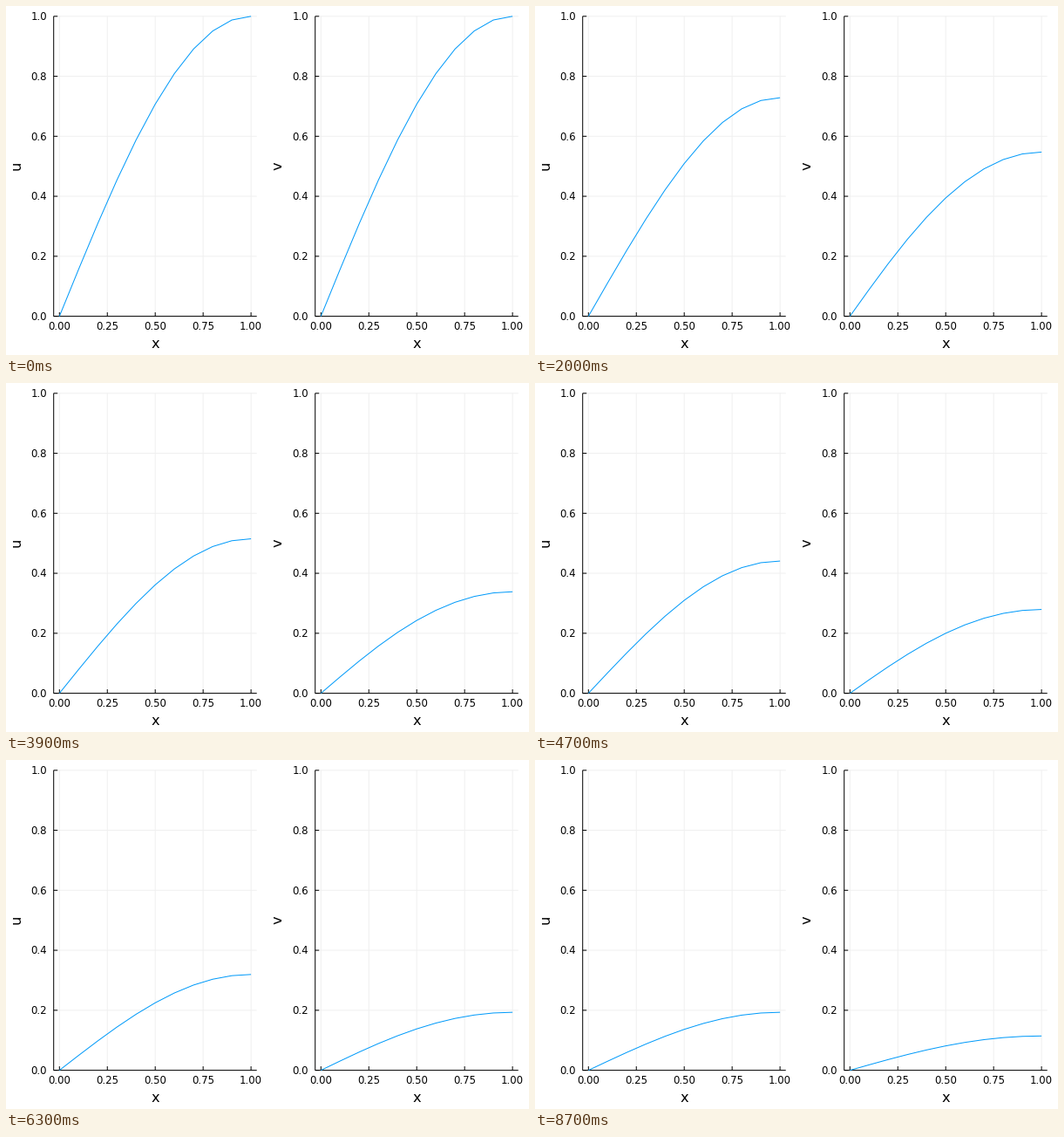
These frames come from a looping animation (600 px wide and 400 px high, 8800 ms). A matplotlib script:

```python
import numpy as np
import matplotlib.pyplot as plt
from matplotlib.animation import FuncAnimation

W, H, DPI = 600, 400, 100
PX = 72 / DPI
FRAMES, INTERVAL = 88, 100
PANEL_W, X0, X_SPAN = 300, 61.3, 219.8
Y0, Y_SPAN = 355.6, 343.8
LEFT, RIGHT = 54.7, 287.7
DU, DV = 0.8, 0.7

plt.rcParams["font.family"] = "DejaVu Sans"

x = np.linspace(0, 1, 11)
diffusion = np.array([[DU], [DV]])


def close_ends(w):
    """Zero value on the left, zero slope on the right."""
    w[..., 0] = 0
    w[..., -1] = (4 * w[..., -2] - w[..., -3]) / 3
    return w


def rate(w):
    d = np.zeros_like(w)
    d[:, 1:-1] = diffusion * (w[:, 2:] - 2 * w[:, 1:-1] + w[:, :-2]) / 0.01
    uv = w[0] * w[1]
    d[0] += uv
    d[1] -= uv
    return d


def frame_time(n):
    """Even steps after a longer start, reaching t = 1 at the end."""
    start = 0.015
    return (1 - start) * n / (FRAMES - 1) + start * (1 - np.exp(-n))


def solve():
    """u' = DU u_xx + uv, v' = DV v_xx - uv, by the midpoint rule."""
    w = np.array([np.sin(np.pi * x / 2)] * 2)
    states = [w]
    sub = 12
    for n in range(1, FRAMES):
        dt = (frame_time(n) - frame_time(n - 1)) / sub
        for _ in range(sub):
            mid = close_ends(w + dt / 2 * rate(w))
            w = close_ends(w + dt * rate(mid))
        states.append(w)
    return states


states = solve()

fig = plt.figure(figsize=(W / DPI, H / DPI), dpi=DPI, facecolor="white")
ax = fig.add_axes([0, 0, 1, 1])
ax.set_xlim(0, W)
ax.set_ylim(H, 0)
ax.axis("off")


def stroke(xs, ys, color="black", z=2):
    return ax.plot(xs, ys, color=color, lw=PX, zorder=z, snap=False,
                   solid_capstyle="butt")[0]


def label(px, py, s, size, ha="center", rot=0):
    ax.text(px, py, s, fontsize=size * PX, ha=ha, va="baseline",
            rotation=rot, rotation_mode="anchor")


def to_x(v, dx):
    return dx + X0 + X_SPAN * v


def to_y(v):
    return Y0 - Y_SPAN * v


def panel(dx, name):
    left, right, top = dx + LEFT, dx + RIGHT, to_y(1)
    for v in np.linspace(0, 1, 5):
        px = to_x(v, dx)
        stroke([px, px], [Y0, top], "#f0f0f0", 1)
        stroke([px, px], [Y0, Y0 - 4.5])
        label(px, 371.2, f"{v:.2f}", 11.8)
    for v in np.linspace(0, 1, 6):
        py = to_y(v)
        stroke([left, right], [py, py], "#f0f0f0", 1)
        stroke([left, left + 4.5], [py, py])
        label(dx + 46.9, py + 4.4, f"{v:.1f}", 11.8, "right")
    stroke([left, right], [Y0, Y0])
    stroke([left, left], [Y0, top])
    label(dx + 171.3, 391.6, "x", 16.3)
    label(dx + 16.2, 183.1, name, 16.3, rot=90)
    return stroke(to_x(x, dx), to_y(states[0][0]), "#009afa", 3)


curves = [panel(0, "u"), panel(PANEL_W, "v")]


def draw(n):
    for curve, values in zip(curves, states[n]):
        curve.set_ydata(to_y(values))
    return curves


anim = FuncAnimation(fig, draw, frames=FRAMES, interval=INTERVAL,
                     init_func=lambda: draw(0), repeat=True, repeat_delay=0)
plt.show()
```
